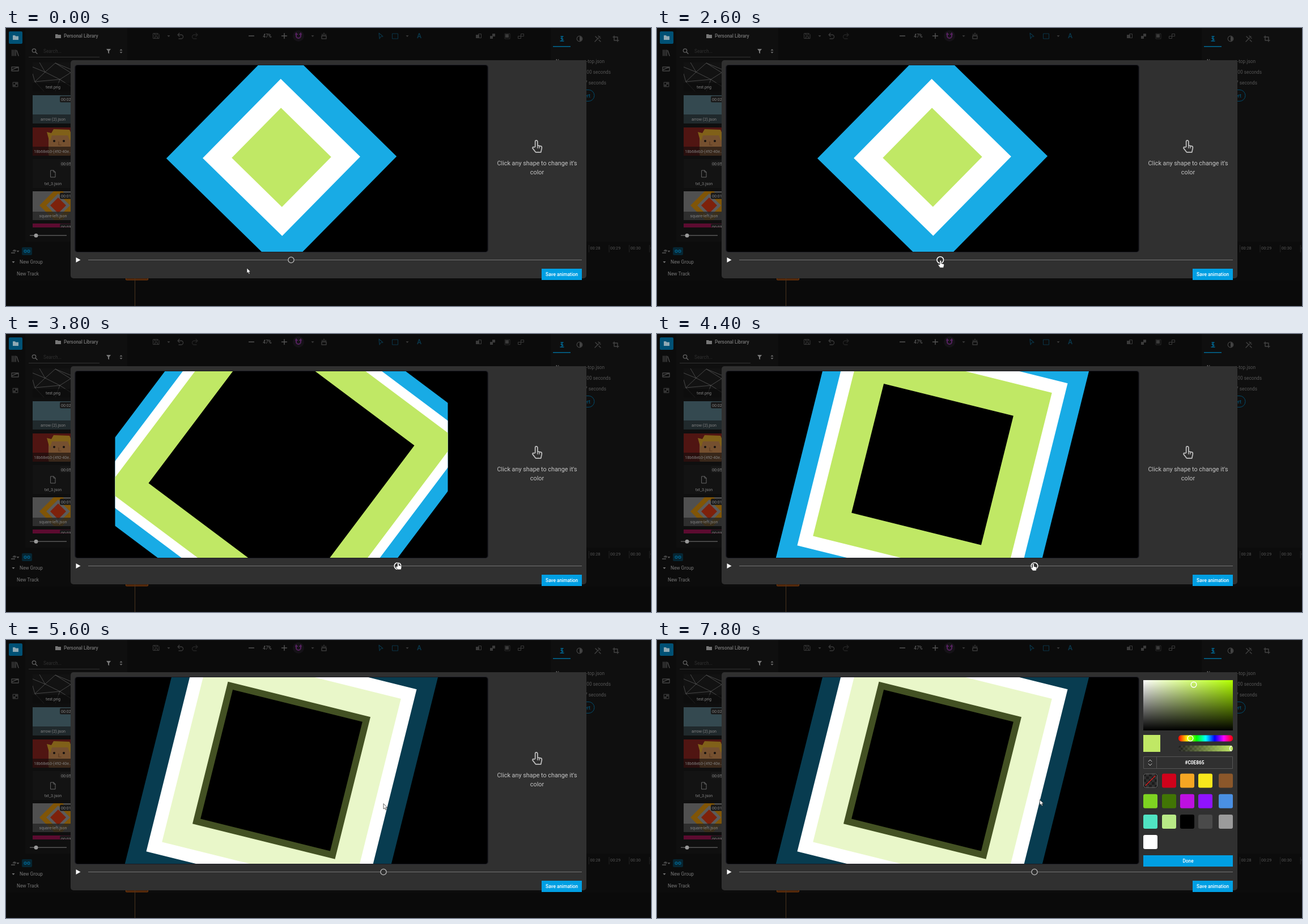
Animation of 1138 by 492 pixels, one loop 8000 ms. Source, as an HTML page with a canvas:

```html
<!DOCTYPE html>
<html lang="en">
<head>
<meta charset="utf-8">
<title>Shape color editor</title>
<style>
html, body { margin: 0; width: 100%; height: 100%; overflow: hidden; background: #0b0b0b; }
canvas { display: block; }
</style>
</head>
<body>
<canvas id="stage" width="1138" height="492"></canvas>
<script>
const ctx = document.getElementById('stage').getContext('2d');
const LOOP = 8000, STEP = 200, ACCENT = '#009fe3';

// time, pointer x, pointer y
const pointerKeys = [
  [0, 425, 425], [1000, 497, 406], [1200, 503, 405], [1400, 502, 409], [1800, 476, 412],
  [2000, 470, 413], [2400, 494, 412], [3200, 520, 409], [3400, 558, 407], [3600, 640, 406],
  [3800, 692, 404], [4200, 666, 405], [4400, 664, 406], [4600, 625, 365], [4800, 613, 320],
  [5000, 625, 314], [5200, 656, 302], [5600, 666, 290], [5800, 666, 290], [6000, 690, 286],
  [6200, 696, 284], [6400, 696, 284], [6600, 645, 281], [7000, 630, 278], [7400, 633, 279],
  [7600, 642, 282], [7800, 675.4, 283]
];
// time, slider x
const sliderKeys = [
  [0, 503], [1400, 503], [1800, 477], [2000, 470], [2400, 494], [3200, 517],
  [3400, 529], [3600, 622], [3800, 691], [4200, 666]
];

function at(keys, t) {
  let i = keys.length - 1;
  while (keys[i][0] > t) i--;
  const a = keys[i], b = keys[i + 1] || a;
  const k = b === a ? 0 : (t - a[0]) / (b[0] - a[0]);
  return a.slice(1).map((v, j) => v + (b[j + 1] - v) * k);
}

function rect(x, y, w, h, fill, r = 0, stroke) {
  ctx.beginPath();
  ctx.roundRect(x, y, w, h, r);
  if (fill) { ctx.fillStyle = fill; ctx.fill(); }
  if (stroke) { ctx.strokeStyle = stroke; ctx.lineWidth = 1; ctx.stroke(); }
}
function circle(x, y, r, fill, stroke, width = 1) {
  ctx.beginPath();
  ctx.arc(x, y, r, 0, 7);
  if (fill) { ctx.fillStyle = fill; ctx.fill(); }
  if (stroke) { ctx.strokeStyle = stroke; ctx.lineWidth = width; ctx.stroke(); }
}
function path(d, x, y, fill, stroke, width = 1) {
  const p = new Path2D(d);
  ctx.save();
  ctx.translate(x, y);
  ctx.lineJoin = ctx.lineCap = 'round';
  if (fill) { ctx.fillStyle = fill; ctx.fill(p); }
  if (stroke) { ctx.strokeStyle = stroke; ctx.lineWidth = width; ctx.stroke(p); }
  ctx.restore();
}
function text(s, x, y, color, align = 'left', size = 8.3, weight = 400) {
  ctx.font = `${weight} ${size}px Roboto, sans-serif`;
  ctx.textAlign = align;
  ctx.textBaseline = 'alphabetic';
  ctx.fillStyle = color;
  ctx.fillText(s, x, y + size * 0.36);
}
const caret = (x, y, c) => path('M-2.5-1H2.5L0 2Z', x, y, c);
function diamond(r) {
  ctx.moveTo(r, 0); ctx.lineTo(0, r); ctx.lineTo(-r, 0); ctx.lineTo(0, -r); ctx.closePath();
}

function topBar() {
  const c = '#3a3a3a', blue = '#0a3548';
  path('M-5-4.500H3L5-2.500V4.500H-5ZM-2.500-4.500V-1.500H2V-4.500M-2.500 4.500V1.500H2.500V4.500', 265, 14, null, c);
  caret(287, 14, c);
  path('M-2-5L-5-2L-2 1M-5-2H1A3.500 3.500 0 0 1 1 5H-3', 308, 14, null, c, 1.3);
  path('M2-5L5-2L2 1M5-2H-1A3.500 3.500 0 0 0-1 5H3', 333, 14, null, '#242424', 1.3);
  path('M-4.500 0H4.500', 433, 14, null, '#555', 1.4);
  text('47%', 461, 14, '#666', 'center');
  path('M-4.500 0H4.500M0-4.500V4.500', 491, 14, null, '#555', 1.4);
  circle(516, 14, 10, '#151217');
  path('M-4-5V0A4 4 0 0 0 4 0V-5M-5-3H-2M2-3H5', 516, 14, null, '#55215f', 2);
  caret(541, 14, c);
  path('M-4 0H4V5H-4ZM-3 0V-3M0 0V-5M3 0V-3', 561, 14, null, c, 1.5);
  path('M-3-5L4 1L0 1.500L-2 5Z', 661, 14, null, blue, 1.2);
  rect(681.5, 10, 10, 9, null, 0, blue);
  caret(708, 14, c);
  text('A', 729, 14, blue, 'center', 12, 700);
  rect(829, 12, 6, 6, c); rect(833.5, 10.5, 5, 7, null, 0, c);
  rect(854, 14, 5, 5, c); rect(858, 10, 5, 5, c);
  rect(880, 10, 9, 9, null, 0, '#2a2a2a'); rect(881, 11, 6, 6, c);
  rect(903.5, 14.500, 5, 4, null, 0, c); rect(908.5, 10.500, 5, 4, null, 0, c);
}

function leftPanel() {
  rect(0, 0, 34, 378, '#0c0c0c');
  rect(34, 0, 180, 378, '#0f0f0f');
  rect(5, 6, 24, 22, '#005175', 2);
  path('M-5-4H-1L0-2.500H5V4H-5Z', 17, 17, '#8fa9b4');
  path('M-5-5V5M-2-5V5M1-5V5M3-4L6 5', 16, 44, null, '#444', 1.6);
  path('M-6-3H6V4H-6ZM-6 2L6-3', 16, 72, null, '#444', 1.4);
  rect(11.5, 95.5, 10, 9, '#333', 1); rect(13, 97, 3, 3, '#0c0c0c'); rect(17, 100, 3, 3, '#0c0c0c');
  path('M-4-3H-1L0-2H5V4H-5V-3Z', 92, 14, '#777');
  text('Personal Library', 102, 14, '#777', 'left', 8.3, 500);
  circle(49.5, 40, 3.2, null, '#666', 1.2);
  path('M0 0L3 3', 52, 42.500, null, '#666', 1.3);
  text('Search...', 66, 41, '#303030');
  rect(40, 51, 125, 1, '#333');
  path('M-4-4H4L1 0V4.500L-1 3V0Z', 181, 41, '#777');
  path('M-2.500-1L0-4L2.500-1ZM-2.500 1L0 4L2.500 1Z', 203, 41, '#666');

  rect(47, 61, 73, 51, '#121212');
  ctx.save();
  ctx.beginPath(); ctx.rect(47, 61, 73, 51); ctx.clip();
  path('M0 8L22 17L40 1M22 17L12 0M22 17L4 34L0 20M22 17L48 30L67 18L40 1L67 12M48 30L40 51M48 30L67 42M4 34L20 51M4 34L48 30', 47, 61, null, '#555', 0.8);
  ctx.restore();
  rect(47, 97, 73, 15, 'rgba(12,12,12,.65)');
  rect(47, 119, 73, 50, '#344950');
  rect(47, 153, 73, 16, '#20292c');

  ctx.save();
  ctx.beginPath(); ctx.rect(47, 176, 73, 50); ctx.clip();
  rect(47, 176, 73, 50, '#501512');
  rect(75, 188, 39, 40, '#75502f', 5);
  path('M0 15L-3 4L5 6L9-1L37 0L41 9L38 20L34 10H6L3 20Z', 75, 180, '#806019');
  circle(85, 200, 2, '#17120f'); circle(102, 200, 2, '#17120f');
  path('M0 0V6H4', 93, 201, null, '#583820', 1.2);
  ctx.restore();
  rect(47, 210, 73, 16, 'rgba(15,12,12,.6)');

  rect(47, 232, 73, 51, '#131313');
  path('M-4-6H1L4-3V6H-4ZM1-6V-3H4', 83, 258, null, '#666');
  rect(47, 289, 73, 51, '#505050');
  ctx.save();
  ctx.beginPath(); ctx.rect(47, 289, 73, 51); ctx.clip();
  ctx.translate(92, 314);
  [[33, '#805507'], [21, '#5b5b5b'], [14, '#7d210b']].forEach(([r, c]) => {
    ctx.beginPath(); diamond(r); ctx.fillStyle = c; ctx.fill();
  });
  ctx.restore();
  rect(47, 325, 73, 15, 'rgba(35,35,35,.75)');
  rect(47, 346, 73, 7, '#5c0b30');
  [['test.png', 104], ['arrow (2).json', 161], ['18b68eb3-(492-40e...', 218], ['txt_3.json', 275], ['square-left.json', 332]]
    .forEach(([s, y]) => text(s, 83, y, '#808080', 'center', 7.1));
  [['00:02', 126], ['00:05', 240], ['00:01', 297], ['00:03', 352]].forEach(([s, y]) => {
    rect(95, y - 5.5, 24, y > 340 ? 6 : 11, '#191919', 2);
    ctx.save();
    ctx.beginPath(); ctx.rect(95, y - 6, 24, y > 340 ? 7 : 12); ctx.clip();
    text(s, 97, y, '#888', 'left', 7.1);
    ctx.restore();
  });
  rect(42, 366.5, 65, 1.3, '#666');
  circle(53, 367.3, 3.5, '#999');
}

function rightPanel() {
  rect(961, 0, 177, 378, '#0f0f0f');
  path('M-2-4H2M0-4V4M-3 4H3M-2-1L2 1', 981, 19, null, '#006a96', 1.4);
  rect(965, 32, 31, 1.5, '#006a96');
  circle(1012, 19, 4.8, null, '#444', 1.2);
  path('M0-4A4 4 0 0 1 0 4Z', 1012, 19, '#444');
  path('M-5 5L4-4M-4-4L-1-1M2 2L5 5M1-5L5-1', 1044, 19, null, '#444', 1.3);
  path('M-3-5V3H5M-5-3H3V5', 1076, 19, null, '#444', 1.4);
  text('Name:', 970, 59, '#666', 'left', 8.3, 500);
  text('square-top.json', 1056, 59, '#555', 'right');
  text('10.00 seconds', 1067, 78, '#555', 'right');
  text('7 seconds', 1059, 97, '#555', 'right');
  rect(975, 109.5, 63, 20, null, 10, '#004d6e');
  text('Convert', 1031, 120, '#00618a', 'right');
}

function timeline() {
  rect(0, 378, 1138, 114, '#0c0c0c');
  rect(0, 447, 1138, 45, '#0a0a0a');
  path('M-6 2H1V4H-6ZM-4 0L-1-3L3-2L2 1Z', 15, 395, '#444');
  caret(21, 395, '#555');
  rect(28, 388, 18, 14, '#062633', 2);
  circle(34, 395, 2, null, '#00608a', 1.3); circle(40, 395, 2, null, '#00608a', 1.3);
  caret(13, 414, '#777');
  text('New Group', 24, 414, '#777');
  text('New Track', 19, 435, '#777');
  for (let i = 0; i < 4; i++) {
    const x = 1028 + i * 35.6;
    rect(x, 384, 1, 13, '#252525');
    text('00:' + (28 + i), x + 2.5, 389, '#555', 'left', 7.3);
  }
  rect(211.5, 430, 39, 16, '#49240a', 1, '#7a3b0c');
  rect(227, 443, 1, 49, '#4a341f');
}

function backdrop() {
  rect(0, 0, 1138, 492, '#0b0b0b');
  topBar();
  leftPanel();
  rightPanel();
  timeline();
}

// Pose of the nested squares for a slider position.
function pose(s) {
  const d = Math.max(0, 561 - s);
  const u = Math.min(1, Math.max(0, (s - 594) / 119));
  const e = u * u * (3 - 2 * u), g = e ** 1.07, k = 1 - d * d * 1.6e-6;
  return {
    cy: 230.7 - d * d * 5e-4,
    angle: (90 * e - 0.009 * d) * Math.PI / 180,
    rings: [
      { color: '#18abe5', r: (204.3 + 186 * g) * k, hole: 313 * g },
      { color: '#ffffff', r: (139.7 + 218 * g) * k, hole: 288 * g },
      { color: '#c0e865', r: (88.2 + 248 * g) * k, hole: 262 * g }
    ]
  };
}

function hovered(p, x, y) {
  if (y > 396) return -1;
  const c = Math.cos(p.angle), n = Math.sin(p.angle), dx = x - 486, dy = y - p.cy;
  const m = Math.abs(dx * c + dy * n) + Math.abs(dy * c - dx * n);
  for (let i = 2; i >= 0; i--) if (m < p.rings[i].r && m > p.rings[i].hole) return i;
  return -1;
}

function preview(p, hover) {
  rect(121, 65, 730, 332, '#1b1b22', 5);
  rect(122.5, 66, 727, 330, '#000', 4);
  ctx.save();
  ctx.beginPath(); ctx.rect(192.5, 66, 587, 330); ctx.clip();
  ctx.translate(486, p.cy);
  ctx.rotate(p.angle);
  p.rings.forEach((ring, i) => {
    ctx.globalAlpha = hover < 0 || hover === i ? 1 : 0.35;
    ctx.fillStyle = ring.color;
    ctx.beginPath(); diamond(ring.r); diamond(ring.hole);
    ctx.fill('evenodd');
  });
  ctx.restore();
}

const HAND = 'M-1.500 7V1.300A1.300 1.300 0 0 1 1.200 1.300V5.500L5 6.300Q6.300 6.700 6 8.500L5 13H-1L-4.500 8.500Q-4.500 6.800-2.800 7.500Z';

function hint() {
  ctx.save();
  ctx.translate(936, 199);
  ctx.scale(1.55, 1.6);
  path(HAND, 0, 0, null, '#c0c0c0', 1.1);
  path('M1.200 6V8.500M3.200 6.500V8.500', 0, 0, null, '#c0c0c0', 0.9);
  ctx.restore();
  text("Click any shape to change it's", 937, 239, '#c4c4c4', 'center', 10.8);
  text('color', 937, 255, '#c4c4c4', 'center', 10.8);
}

function gradient(x0, y0, x1, y1, colors) {
  const g = ctx.createLinearGradient(x0, y0, x1, y1);
  colors.forEach((c, i) => g.addColorStop(i / (colors.length - 1), c));
  return g;
}
function checker(x, y, w, h, size) {
  for (let j = 0; j * size < h; j++)
    for (let i = 0; i * size < w; i++)
      rect(x + i * size, y + j * size, Math.min(size, w - i * size), Math.min(size, h - j * size), (i + j) % 2 ? '#303030' : '#1c1c1c');
}

function picker() {
  rect(858, 71, 158, 89, gradient(858, 0, 1016, 0, ['#fff', '#b2ff00']));
  rect(858, 71, 158, 89, gradient(0, 71, 0, 160, ['rgba(0,0,0,0)', '#000']));
  circle(947, 79, 4.8, null, '#fff', 1.4);
  rect(858, 168, 30, 30, '#c0e865');
  rect(920, 168.5, 96, 11, gradient(920, 0, 1016, 0, ['#f00', '#ff0', '#0f0', '#0ff', '#00f', '#f0f', '#f00']), 5);
  circle(941, 174, 4.8, null, '#fff', 1.4);
  ctx.save();
  ctx.beginPath(); ctx.roundRect(920, 186.5, 96, 11, 5); ctx.clip();
  checker(920, 186.5, 96, 11, 4);
  rect(920, 186.5, 96, 11, gradient(920, 0, 1016, 0, ['rgba(192,232,101,0)', '#c0e865']));
  circle(1015, 192, 4.5, null, '#fff', 1.4);
  ctx.restore();
  rect(858.5, 206.5, 157, 21, null, 0, '#555');
  rect(881, 207, 1, 20, '#555');
  path('M-3-2L0-5L3-2M-3 2L0 5L3 2', 870, 217, null, '#ccc');
  text('#C0E865', 948.5, 217, '#fff', 'center', 8.3, 600);

  const columns = [858, 891, 923, 955, 991];
  const swatches = ['', '#d0021b', '#f5a623', '#f8e71c', '#8b572a', '#7ed321', '#417505', '#bd10e0',
    '#9013fe', '#4a90e2', '#50e3c2', '#b8e986', '#000', '#4a4a4a', '#9b9b9b', '#fff'];
  swatches.forEach((c, i) => {
    const x = columns[i % 5], y = 236.5 + 36.2 * Math.floor(i / 5);
    if (c) return rect(x, y, 25, 25, c, 3);
    checker(x, y, 25, 25, 5);
    rect(x + 0.5, y + 0.5, 24, 24, null, 3, '#666');
    path('M4 21L21 4', x, y, null, '#e02020', 1.3);
  });
  rect(858, 381, 158, 20, ACCENT);
  text('Done', 937, 391, '#fff', 'center', 8.3, 500);
}

function player(s, active) {
  path('M0 0L8 4.500L0 9Z', 123.5, 406, '#fff');
  rect(145, 410, 871, 1, '#747474');
  circle(s, 410.5, active ? 5.8 : 5.1, '#303030', active ? '#fff' : '#bdbdbd', active ? 1.6 : 1.3);
  rect(945, 426, 71, 20, ACCENT);
  text('Save animation', 980.5, 436, '#fff', 'center', 8.3, 500);
}

function ripple(t, start, x, y) {
  const age = t - start;
  if (age >= 0 && age <= 400) circle(x, y, 13, `rgba(190,30,50,${0.5 - age * 0.0007})`);
}

function draw(t) {
  const [x, y] = at(pointerKeys, t), [s] = at(sliderKeys, t);
  const hand = t >= 1000 && y > 400;
  const p = pose(s);
  backdrop();
  rect(114, 57, 910, 386, '#303030', 5);
  preview(p, t < 4600 ? -1 : hovered(p, x, y));
  if (t >= 7200) picker(); else hint();
  player(s, hand);
  ripple(t, 1400, 502, 413);
  ripple(t, 7000, 630, 278);
  if (hand) path(HAND, x, y, '#fff', '#222', 0.7);
  else path('M0 0V9L2.100 7.200L3.600 10.500L5.200 9.800L3.800 6.600H6.500Z', x, y, '#fff', '#222', 0.7);
}

let last = -1;
function tick() {
  const t = Math.floor(performance.now() % LOOP / STEP) * STEP;
  if (t !== last) draw(last = t);
  requestAnimationFrame(tick);
}
tick();
</script>
</body>
</html>
```
